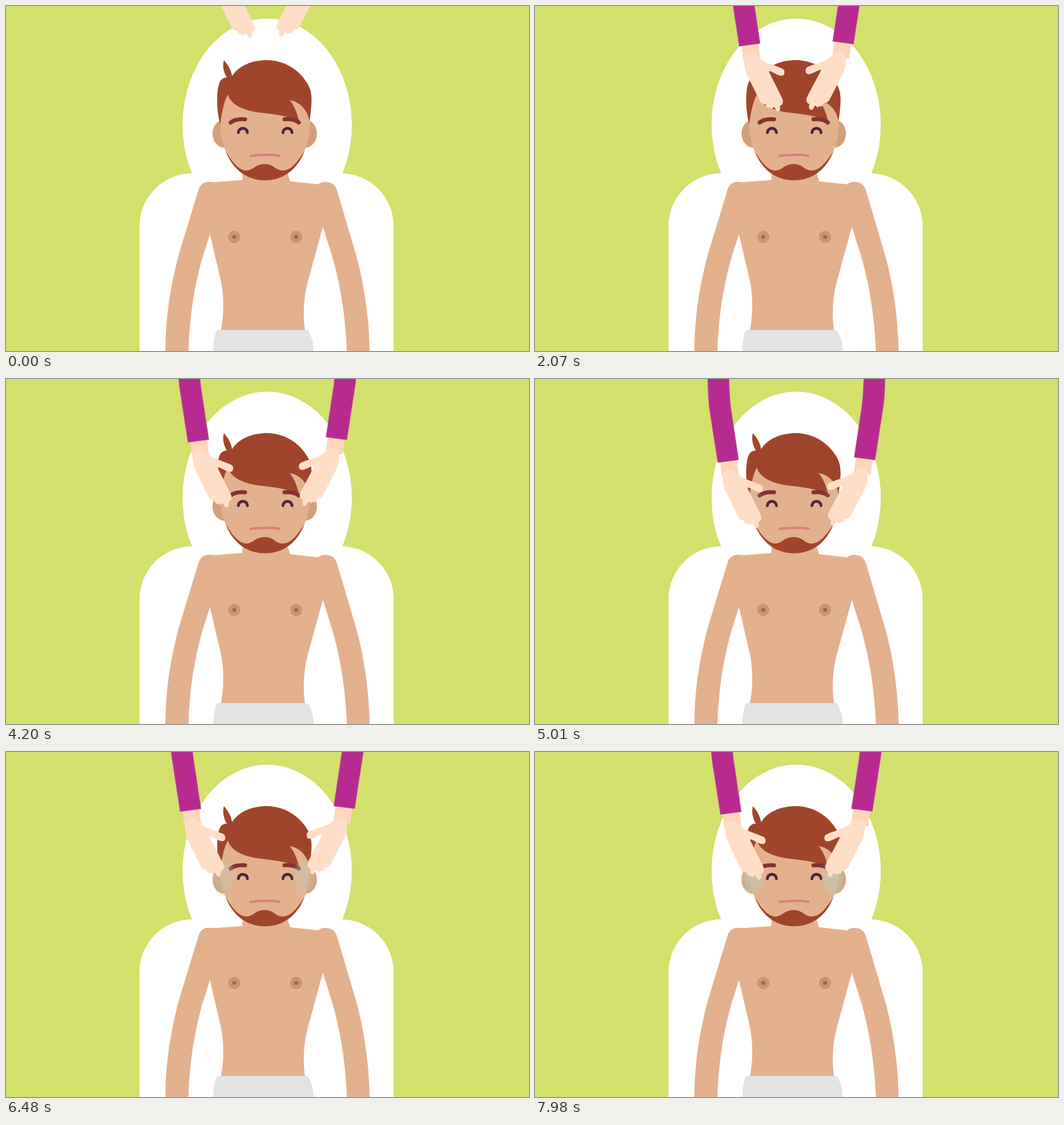
Write an HTML page that moves like this. It is 850 by 561 pixels and loops after 8000 ms.

```html
<!DOCTYPE html>
<html lang="en">
<head>
<meta charset="utf-8">
<title>Head massage</title>
<style>
  html, body { margin: 0; width: 100%; height: 100%; overflow: hidden; background: #d3e06c; }
  svg { display: block; width: 100vw; height: 100vh; }
</style>
</head>
<body>
<svg viewBox="0 0 850 561">
  <defs>
    <radialGradient id="haze">
      <stop offset="0" stop-color="#c0cbb2"/>
      <stop offset=".6" stop-color="#c0cbb2" stop-opacity=".8"/>
      <stop offset="1" stop-color="#c0cbb2" stop-opacity="0"/>
    </radialGradient>
    <g id="sleeve">
      <path fill="#fcd6bb" d="M339 3L342.5 30L370 27L366.5 0Z"/>
      <path fill="#b72b91" stroke="#c763ab" stroke-width=".6" stroke-linejoin="round"
        d="M335.5 6L321.5 -85Q319 -108 319 -150H353.500Q354 -108 356.5 -85L369.5 1.5Z"/>
    </g>
    <path id="hand" fill="#ffdec8" d="M343.3 28C343.5 20 348 16.5 354 16.5C361 17 364 21 369 26
      C378 33 394 37 405 42C409 44 410 48 408 52C406 55 402 54 398 52.5L387 47Q383 45 384.5 49
      L404 88Q409 97 404 101.5Q400.5 102 402 107C402 113 396 113.5 394.5 109
      Q393.5 104 390.5 105.500Q388 110 385.5 105.5C381 107.5 379 104 378.5 100Q374 101 370 97
      L347 50Q343.5 40 343.3 28Z"/>
    <path id="eye" d="M377.6 206A7.3 7 0 0 1 392.4 206"/>
    <g id="nipple">
      <circle r="10" fill="#cd946d"/>
      <circle r="3.2" fill="#9f6550"/>
    </g>
  </defs>

  <rect width="850" height="561" fill="#d3e06c"/>
  <g fill="#fff">
    <ellipse cx="424.5" cy="193" rx="137.5" ry="172.5"/>
    <path d="M217 561V358A86 86 0 0 1 303 272H544A86 86 0 0 1 630 358V561Z"/>
  </g>

  <path fill="#e4b18f" d="M385 265L384 283L337 286.500C326 284 316 287 312.5 300L281.5 402
    C267 455 259 510 259 561H296.500C298 510 305 460 319 410L331.5 371L349 446C354 470 355 500 349 528
    H486C482 500 484 475 490 450L515 359L531 410C545 460 552 510 554 561H591C590 510 583 455 569 405
    L538 300C535 289 527 286 519 286Q512 286 507 290L462 285L456 268Z"/>
  <use href="#nipple" x="371" y="375.5"/>
  <use href="#nipple" x="471.5" y="375.5"/>
  <path fill="#e3e3e3" d="M345 527H488Q491 527 493 531Q500 545 500 561H337Q337 545 341 531Q342 527 345 527Z"/>

  <g fill="#d59e7b">
    <ellipse cx="355" cy="207.5" rx="19.3" ry="23"/>
    <ellipse cx="486" cy="207.5" rx="19.3" ry="23"/>
  </g>
  <path fill="#e4b18f" d="M348 188C348 205 351 222 357 236C368 265 391 283 421 283
    C451 283 474 265 485 236C491 222 494 205 494 185L490 125H360Z"/>
  <g fill="#a0452b">
    <path d="M357 236C368 265 391 283.5 421 283.5C451 283.5 474 265 485 236C473 255 462 267.5 450 267.5
      C437 267.5 436 257 420.5 257C404 257 403 267.5 390 267.5C378 267 367 253 357 236Z"/>
    <path d="M348 192C341 165 342 130 349 121Q353 116 359 116.500C353 106 352 98 354 88C362 97 366 105 367.5 114
      C378 97 400 88 424 88C456 88 481 108 492 130C498 142 497 156 495.5 170L493.5 187
      C489 168 478 156 461 153C469 163 473 173 477 190C460 177 432 176 410 173C383 169 366 160 360.5 144
      C353 158 351 175 348 192Z"/>
  </g>
  <g fill="none" stroke-linecap="round">
    <path stroke="#843231" stroke-width="6.5" d="M365 189.5Q373 183 388.5 184.300M452.5 184.3Q468 183 476 189.5"/>
    <g stroke="#4e2640" stroke-width="4.6"><use href="#eye"/><use href="#eye" x="72.5"/></g>
    <path stroke="#db7f7f" stroke-width="4" d="M397.5 243.8Q421 240.5 444.5 243.3"/>
  </g>

  <g id="glow" fill="url(#haze)">
    <ellipse cx="354" cy="204" rx="21" ry="33"/>
    <ellipse cx="485" cy="204" rx="21" ry="33"/>
  </g>
  <g id="left"><use href="#sleeve"/><use href="#hand"/></g>
  <g id="right"><use href="#sleeve"/><use href="#hand" transform="translate(3.5 2) rotate(-1.3 350 0)"/></g>
</svg>
<script>
const LOOP = 8000;
const MIRROR = 849.7;

// Key poses of the left arm: reach down, part, sink along the face, circle the temples
const poses = [
  { t: 0, x: -2, y: -60 },
  { t: 990, x: 0, y: 0 },
  { t: 2070, x: -3.5, y: 59.5 },
  { t: 3390, x: -38.5, y: 65.5 },
  { t: 5010, x: -38.5, y: 130 },
  { t: 5670, x: -51, y: 128 },
  { t: 6480, x: -52.5, y: 91 },
  { t: 7320, x: -39, y: 84 },
  { t: LOOP, x: -34, y: 96 },
];

function slope(axis, i) {
  const a = poses[Math.max(i - 1, 0)], b = poses[Math.min(i + 1, poses.length - 1)];
  return (b[axis] - a[axis]) / (b.t - a.t);
}

// Smooth cubic curve through the key poses
function position(axis, t) {
  const i = poses.findLastIndex(pose => pose.t <= t);
  const a = poses[i], b = poses[i + 1];
  const span = b.t - a.t, u = (t - a.t) / span, w = 1 - u;
  return a[axis] * (1 + 2 * u) * w * w + b[axis] * u * u * (3 - 2 * u)
    + span * u * w * (slope(axis, i) * w - slope(axis, i + 1) * u);
}

const [left, right, glow] = ["left", "right", "glow"].map(id => document.getElementById(id));

function draw() {
  const t = performance.now() % LOOP;
  const x = position("x", t), y = position("y", t);
  const lift = 3 + 2 * t / LOOP;
  left.setAttribute("transform", `translate(${x} ${y})`);
  right.setAttribute("transform", `translate(${MIRROR - x} ${y - lift}) scale(-1 1)`);
  glow.setAttribute("opacity", 0.75 * Math.max(0, 2 * t / LOOP - 1));
  requestAnimationFrame(draw);
}
draw();
</script>
</body>
</html>
```
